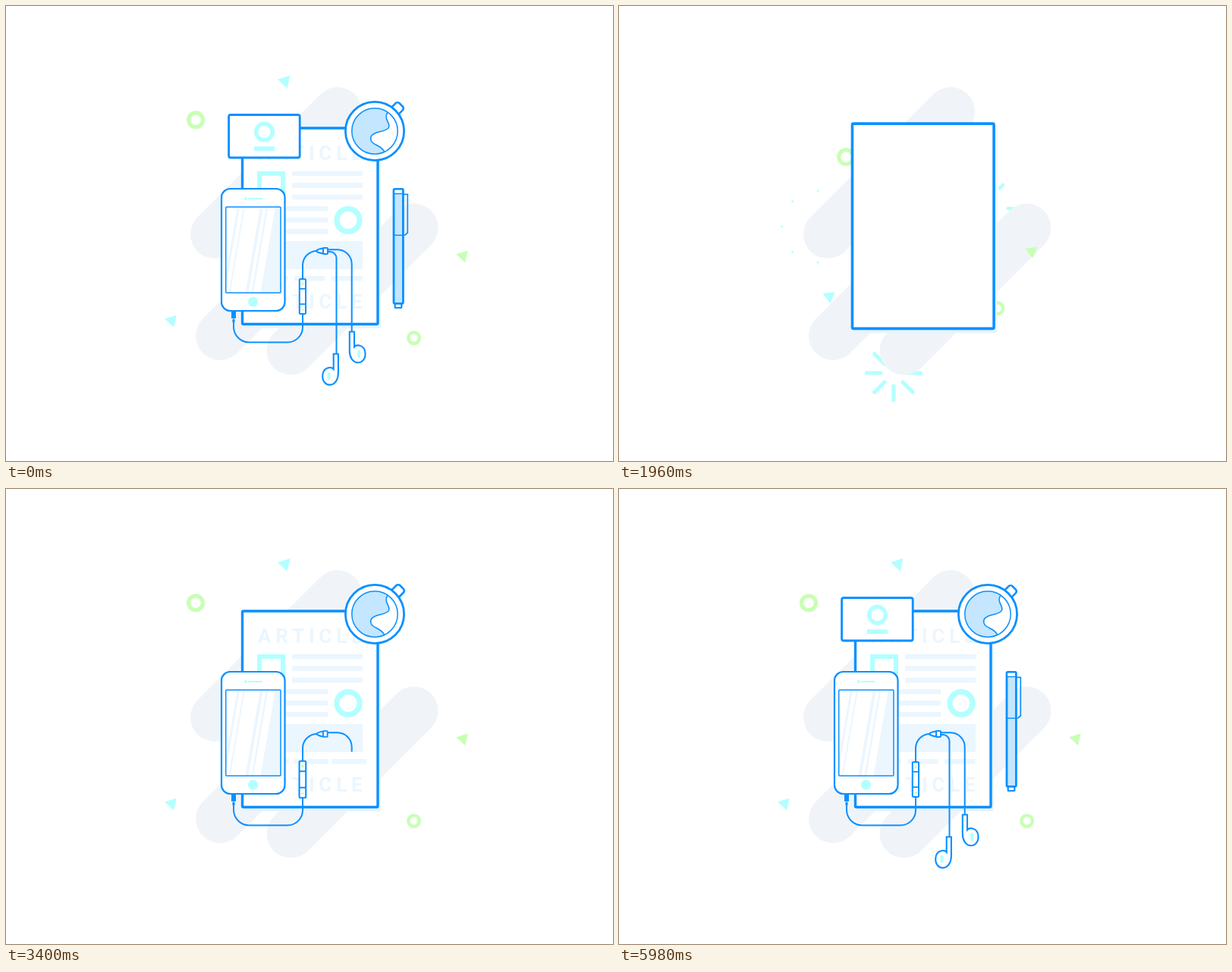
Animation, 800 px wide and 600 px high, one loop 6 s. Source, as an HTML page with a canvas:

```html
<!DOCTYPE html>
<html lang="en">
<head>
<meta charset="utf-8">
<title>Desk</title>
<style>
html, body { margin: 0; width: 100%; height: 100%; overflow: hidden; background: #fff; }
canvas { display: block; }
</style>
</head>
<body>
<canvas id="stage" width="800" height="600"></canvas>
<script>
const canvas = document.getElementById('stage');
const ctx = canvas.getContext('2d');
const BLUE = '#0b90ff', LIQUID = '#c4e6ff', TINT = '#ebf6ff';
const CYAN = '#b3ffff', GREEN = '#c8ffb4', GREY = '#f0f4f8', WHITE = '#fff';
const LOOP = 6000, BUILD = 1640;
let now = 0;

// Progress helpers: all read the current time
const ramp = (start, length) => Math.min(1, Math.max(0, (now - start) / length));
const out = (start, length, power = 3) => 1 - (1 - ramp(start, length)) ** power;
const back = (start, length, pull = 1.7) => {
  const q = ramp(start, length) - 1;
  return Math.max(0, 1 + (pull + 1) * q ** 3 + pull * q * q);
};

// Drawing helpers
function around(x, y, sx, sy, angle, draw) {
  if (!sx || !sy) return;
  ctx.save();
  ctx.translate(x, y);
  ctx.rotate(angle);
  ctx.scale(sx, sy);
  ctx.translate(-x, -y);
  draw();
  ctx.restore();
}
const grow = (x, y, scale, draw) => around(x, y, scale, scale, 0, draw);

function paint(path, fill, stroke, width) {
  if (fill) { ctx.fillStyle = fill; ctx.fill(path); }
  if (stroke) { ctx.strokeStyle = stroke; ctx.lineWidth = width; ctx.stroke(path); }
}
function box(x, y, w, h, r, fill, stroke, width) {
  const path = new Path2D();
  path.roundRect(x, y, w, h, r);
  paint(path, fill, stroke, width);
}
function disc(x, y, r, fill, stroke, width) {
  const path = new Path2D();
  path.arc(x, y, r, 0, 2 * Math.PI);
  paint(path, fill, stroke, width);
}
const shape = (d, fill, stroke, width) => paint(new Path2D(d), fill, stroke, width);

function trace(d, length, progress, width = 2) {
  if (!progress) return;
  ctx.save();
  if (progress < 1) ctx.setLineDash([length * progress, 9999]);
  shape(d, null, BLUE, width);
  ctx.restore();
}

function burst(x, y, radius, start) {
  const p = ramp(start, 450);
  if (p <= 0 || p >= 1) return;
  const inner = out(start, 450);
  const outer = (0.6 + 0.4 * inner) * Math.min(1, 0.4 + p * 6);
  ctx.save();
  ctx.translate(x, y);
  ctx.lineCap = 'round';
  for (let i = 0; i < 8; i++) {
    shape(`M${radius * inner} 0H${radius * Math.max(inner, outer)}`, null, CYAN, 5.3 * (1 - p * p) * radius / 48);
    ctx.rotate(Math.PI / 4);
  }
  ctx.restore();
}

function bars() {
  ctx.lineCap = 'round';
  [[356, 220], [456.5, 373.5], [363, 354]].forEach(([x, y], i) => {
    const p = out(1650 + i * 40, 230), half = 81 * p;
    if (p) shape(`M${x - half} ${y + half}L${x + half} ${y - half}`, null, GREY, 64 * p);
  });
  ctx.lineCap = 'butt';
}

function confetti() {
  const p = out(1694, 1041, 4);
  const fly = (x, y, draw) => {
    ctx.save();
    ctx.translate(411 + (x - 411) * p, 310 + (y - 310) * p);
    ctx.scale(Math.min(1, p * 4), Math.min(1, p * 4));
    draw();
    ctx.restore();
  };
  const triangle = (x, y, r, color) => fly(x, y, () => {
    ctx.rotate(Math.PI * (2 * p + 193 / 180));
    shape(`M${r} 0L${-r / 2} ${r * 0.866}V${-r * 0.866}Z`, color);
  });
  fly(250, 150.3, () => disc(0, 0, 9.4, null, GREEN, 5.2));
  fly(537.6, 437.7, () => disc(0, 0, 7.3, null, GREEN, 4.4));
  triangle(218.3, 414.7, 9.4, CYAN);
  triangle(367.7, 98.9, 10, CYAN);
  triangle(602.3, 329.3, 9.4, GREEN);
}

function textLine(x, y, w, start, fromRight) {
  around(fromRight ? x + w : x, y, back(start, 400, 2.1), 1, 0, () => box(x, y, w, 6.5, 0, TINT));
}

function paper() {
  grow(400.5, 290.5, back(1640, 400), () => {
    box(313, 163, 181, 262, 2, '#e7f4ff');
    box(311.5, 161, 178.5, 258.5, 1.5, WHITE, BLUE, 3.4);
  });

  ctx.save();
  ctx.globalAlpha = ramp(2420, 260);
  ctx.fillStyle = TINT;
  ctx.font = '700 26px Roboto, sans-serif';
  ctx.letterSpacing = '5.8px';
  ctx.fillText('ARTICLE', 332, 202.5);
  ctx.fillText('ARTICLE', 332, 398.5);
  ctx.restore();

  const size = out(2560, 200);
  around(349.5, 236.5, size, size, Math.PI / 2 * (1 - out(2560, 600)), () =>
    box(334, 221, 31, 31, 0, null, CYAN, 6));

  textLine(377, 217.7, 93, 2540);
  textLine(377, 233.2, 93, 2720);
  textLine(377, 248.7, 93, 2860);
  textLine(331, 264, 93, 2720, true);
  textLine(331, 279, 93, 2860, true);
  textLine(331, 294, 93, 3000, true);

  ctx.save();
  ctx.globalAlpha = ramp(2680, 160);
  grow(451, 282.5, 1.5 - 0.5 * out(2680, 400), () => disc(451, 282.5, 15, null, CYAN, 7.2));
  ctx.restore();

  around(331, 328, back(2950, 400), 1, 0, () => box(331, 310, 139, 37, 0, TINT));
  [331, 380, 429].forEach((x, i) => textLine(x, 356, 40.5, 3050 + i * 80));
}

function shine() {
  ctx.save();
  ctx.beginPath();
  ctx.rect(290, 265, 72, 113);
  ctx.clip();
  const stripe = (x, w, delay) => {
    const left = x - 92 * (1 - out(2200 + delay, 800));
    shape(`M${left} 265h${w}l-19.5 113h${-w}Z`, TINT);
  };
  stripe(355, 35, 0);
  [[305, 3], [313, 2], [335, 4], [343, 2.5]].forEach(([x, w]) => stripe(x, w, 120));
  ctx.restore();
}

function phone() {
  ctx.save();
  ctx.globalAlpha = Math.min(1, ramp(2136, 150));
  grow(325.5, 321.5, back(2136, 450), () => {
    box(284, 241, 83.5, 161, 11.5, WHITE, BLUE, 2.2);
    shine();
    box(289.7, 265, 72.3, 113.3, 1, null, BLUE, 1.5);
    disc(325.6, 390, 6.6, CYAN);
    disc(315.8, 254, 2, CYAN);
    box(319, 253, 19, 2, 1, CYAN);
  });
  ctx.restore();
}

function bud(start) {
  grow(456, 430, back(start, 420), () => {
    shape('M452.8 429.5H459V449.5C462 446 473 446.5 473.5 458C473.8 466 469 470.3 464 470.3C457 470.3 452.8 463 452.8 455Z', WHITE, BLUE, 2.1);
    box(463.2, 453.5, 4, 10.5, 2, CYAN);
  });
}

function earphones() {
  const jack = ramp(2740, 90);
  if (jack) box(297, 402.5, 6, 9.5 * jack, 0, BLUE);
  if (jack === 1) box(298.4, 412.5, 3.2, 5, 1.5, BLUE);
  trace('M300 416V423A20.5 20.5 0 0 0 320.5 443.5H371A20 20 0 0 0 391 423.5V342A19 19 0 0 1 410 323', 248, ramp(2840, 480));
  trace('M424 321.3H437A19 19 0 0 1 455.7 340.5V430', 134, ramp(3260, 390));
  trace('M424 324H427A8.5 8.5 0 0 1 435.5 332.5V458', 143, ramp(3450, 464));

  grow(391, 383, back(3130, 350), () => {
    box(386.8, 360, 8.2, 46, 1.5, WHITE, BLUE, 2);
    shape('M387 372.8h8M387 393.2h8', null, BLUE, 1.8);
    box(389.5, 364.5, 3, 4, 1, GREEN);
    box(389, 399.6, 4, 1.8, 0.5, GREEN);
  });
  grow(416, 323, back(3300, 300), () => {
    shape('M408.5 323Q412 320 418 319.5V326.5Q412 326 408.5 323Z', WHITE, BLUE, 1.8);
    box(418, 319, 6, 8, 1, WHITE, BLUE, 2);
  });

  burst(459.5, 467, 27, 3580);
  burst(427, 497, 27, 3905);
  bud(3660);
  ctx.save();
  ctx.translate(890.7, 29.3);
  ctx.scale(-1, 1);
  bud(3915);
  ctx.restore();
}

function cup() {
  grow(486, 165, back(3100, 350), () => {
    ctx.save();
    ctx.translate(486, 165);
    ctx.rotate(-Math.PI / 4);
    box(34, -6.5, 15, 13, 3.5, WHITE, BLUE, 2.6);
    ctx.restore();
  });
  grow(486, 165, back(2950, 400), () => {
    disc(486, 165, 38.6, WHITE, BLUE, 2.8);
    ctx.save();
    ctx.globalAlpha = ramp(3180, 200);
    const wave = 'M503 140C497 149 507 154 504.500 160C501 167 484 164 480.800 173C479 184 494 182 498.500 192';
    shape(wave + 'A30 30 0 1 1 503 140Z', LIQUID);
    ctx.restore();
    trace(wave, 74, ramp(3150, 250), 1.6);
    disc(486, 165, 30.2, null, BLUE, 1.5);
  });
}

function card() {
  grow(340.5, 171.7, back(3600, 400), () => box(293.6, 143.5, 93.6, 56.5, 2.5, WHITE, BLUE, 2.8));
  grow(340.5, 166, back(4120, 400), () => disc(340.5, 166, 10.8, null, CYAN, 5.4));
  around(340.5, 188, back(4260, 400), 1, 0, () => box(327, 185.2, 27, 5.8, 0, CYAN));
  ctx.save();
  ctx.globalAlpha = 0.85;
  burst(292, 142, 35.5, 3812);
  ctx.restore();
}

function pen() {
  around(517, 392, 1, ramp(3860, 160), 0, () => box(512.7, 392, 8.6, 6, 0.5, WHITE, BLUE, 2.2));
  grow(517, 317, back(3500, 450), () => {
    box(511, 241.3, 12.4, 151, 1.5, LIQUID, BLUE, 2.8);
    box(512.4, 242.7, 9.6, 4.3, 0, WHITE);
    shape('M511 247.5h12.400', null, BLUE, 1.5);
  });
  trace('M523.5 248.4H529.3V299L526 302H523', 66, ramp(3750, 220), 1.7);
  trace('M511 302.3H524', 13, ramp(3830, 150), 1.5);
}

function scene() {
  burst(262, 291, 48, BUILD);
  burst(475, 267, 48, 1780);
  burst(362, 484, 48, 1900);
  bars();
  confetti();
  paper();
  phone();
  cup();
  pen();
  earphones();
  card();
}

function frame(time) {
  const t = time % LOOP;
  // The finished scene fades to a faint trace, then builds up again
  const leaving = t < BUILD;
  now = leaving ? LOOP : t;
  canvas.style.opacity = leaving ? Math.max(0.015, 1 - Math.max(0, t - 10) / 450) : 1;
  ctx.clearRect(0, 0, 800, 600);
  scene();
  requestAnimationFrame(frame);
}
const origin = performance.now();
(function start() { requestAnimationFrame(() => frame(performance.now() - origin)); })();
</script>
</body>
</html>
```
